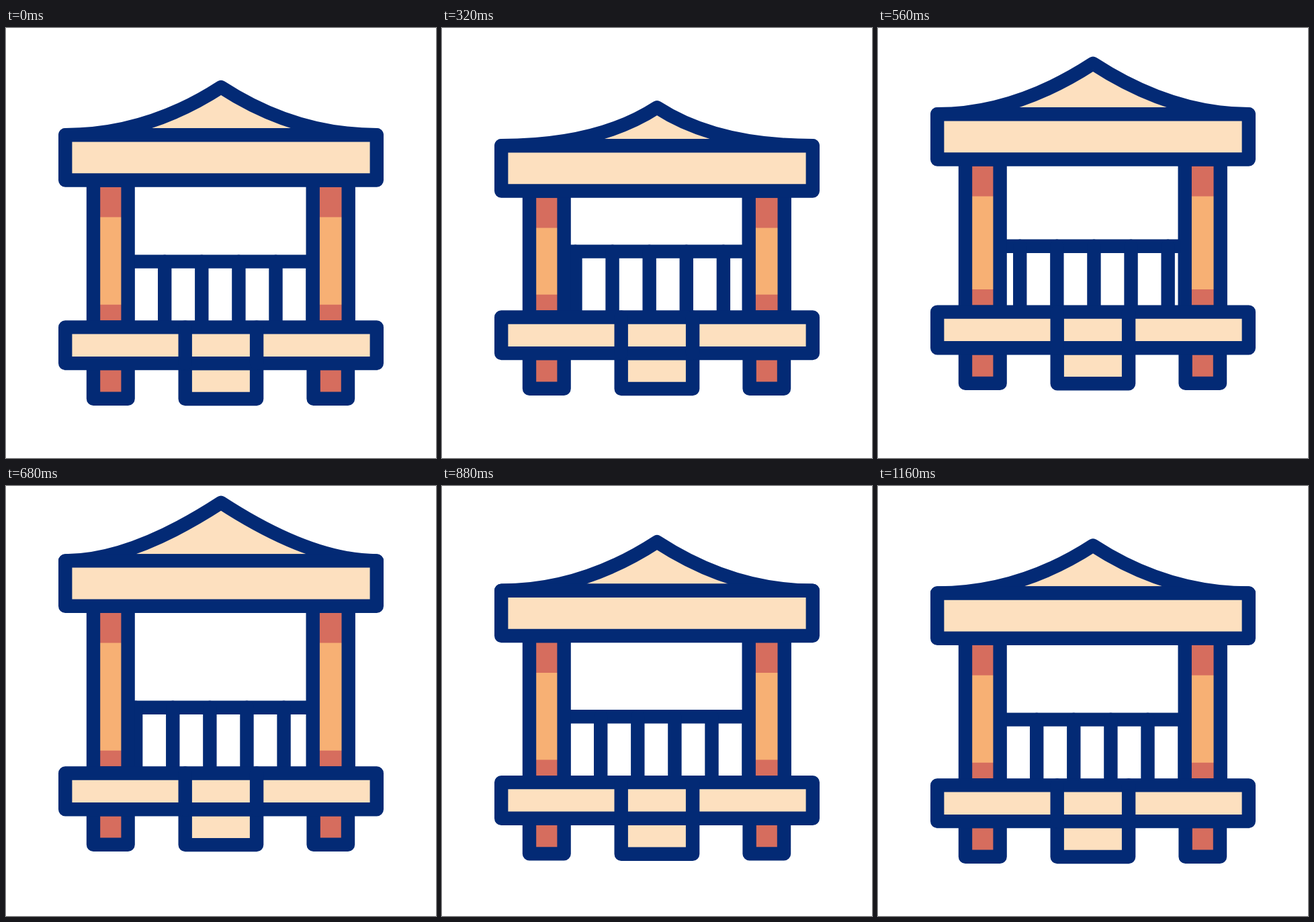
An HTML page for the animation above (1.2 s loop, 640x640 px).

```html
<!DOCTYPE html>
<html lang="en">
<head>
<meta charset="utf-8">
<title>Pavilion</title>
<style>
  html, body { margin: 0; width: 100%; height: 100%; overflow: hidden; background: #fff; }
  svg { display: block; width: 100vw; height: 100vh; }
  .line { stroke: #032a75; stroke-width: 20.4; stroke-linejoin: round; stroke-linecap: round; }
  .cream { fill: #fde0bf; }
  .orange { fill: #f7b074; }
  .red { fill: #d66d5e; }
  .none { fill: none; }
</style>
</head>
<body>
<svg viewBox="0 0 640 640">
  <g id="fence" class="line none">
    <path d="M181.6 347.6H456.7"/>
    <path id="posts"/>
  </g>
  <g id="columns"></g>
  <g id="base">
    <path class="line red" d="M130 499.1H181.6V551.7H130Z M457.6 499.1H509V551.7H457.6Z"/>
    <path class="line cream" d="M266.7 499.1H373.1V552H266.7Z"/>
    <path class="line cream" d="M88.2 445.4H551.8V499.1H88.2Z"/>
    <path class="line none" d="M266.7 445.4V499.1 M373.1 445.4V499.1"/>
  </g>
  <path id="gable" class="line cream"/>
  <path id="band" class="line cream" d="M88.2 159.2H551.8V226.5H88.2Z"/>
</svg>
<script>
const LOOP = 1200, STEP = 40;

// [time in ms, offset in px], eased between neighbours
const tracks = {
  base:  [[75, 0], [482, -23], [535, -23], [1012, 0]],
  fence: [[100, 0], [510, 31.3], [530, 31.3], [790, 0]],
  roof:  [[120, 0], [395, 19.6], [645, -49.5], [1005, 14.2], [1175, 0]],
  peak:  [[120, 0], [395, 37], [650, -64], [660, -64], [1010, 22], [1175, 0]]
};

const $ = id => document.getElementById(id);
const smooth = x => x * x * (3 - 2 * x);

function valueAt(keys, t) {
  if (t <= keys[0][0]) return keys[0][1];
  for (let i = 1; i < keys.length; i++) {
    const [t0, a] = keys[i - 1], [t1, b] = keys[i];
    if (t < t1) return a + (b - a) * smooth((t - t0) / (t1 - t0));
  }
  return keys[keys.length - 1][1];
}

const shift = (id, y) => $(id).setAttribute('transform', `translate(0 ${y})`);
const box = (l, r, top, bottom) => `M${l} ${top}H${r}V${bottom}H${l}Z`;

function postsPath(dx) {
  let d = '';
  for (let i = 0; i < 6; i++) d += `M${181.1 + 55.1 * i + dx} 347.6V445.4`;
  return d;
}

function columnPaths(roof, base) {
  const top = 226.5 + roof, bottom = 445.4 + base;
  return [[130, 181.6], [456.7, 509.7]].map(([l, r]) =>
    `<path class="red" d="${box(l, r, top, bottom)}"/>` +
    `<path class="orange" d="${box(l, r, 281.4 + roof, 411.7 + base)}"/>` +
    `<path class="line none" d="${box(l, r, top, bottom)}"/>`).join('');
}

// The slope at the tip stays constant while the height changes
function gablePath(roof, peak) {
  const y = 159.2 + roof, tip = 88 + peak, run = (y - tip) / 0.65;
  return `M88.2 ${y}Q${320 - run} ${y} 320 ${tip}Q${320 + run} ${y} 551.8 ${y}Z`;
}

function draw(t) {
  const [base, fence, roof, peak] =
    ['base', 'fence', 'roof', 'peak'].map(name => valueAt(tracks[name], t));
  shift('base', base);
  shift('fence', base);
  shift('band', roof);
  $('posts').setAttribute('d', postsPath(fence));
  $('columns').innerHTML = columnPaths(roof, base);
  $('gable').setAttribute('d', gablePath(roof, peak));
}

const start = performance.now();
function tick() {
  const t = (performance.now() - start) % LOOP;
  draw(Math.floor(t / STEP) * STEP);
  requestAnimationFrame(tick);
}
tick();
</script>
</body>
</html>
```
